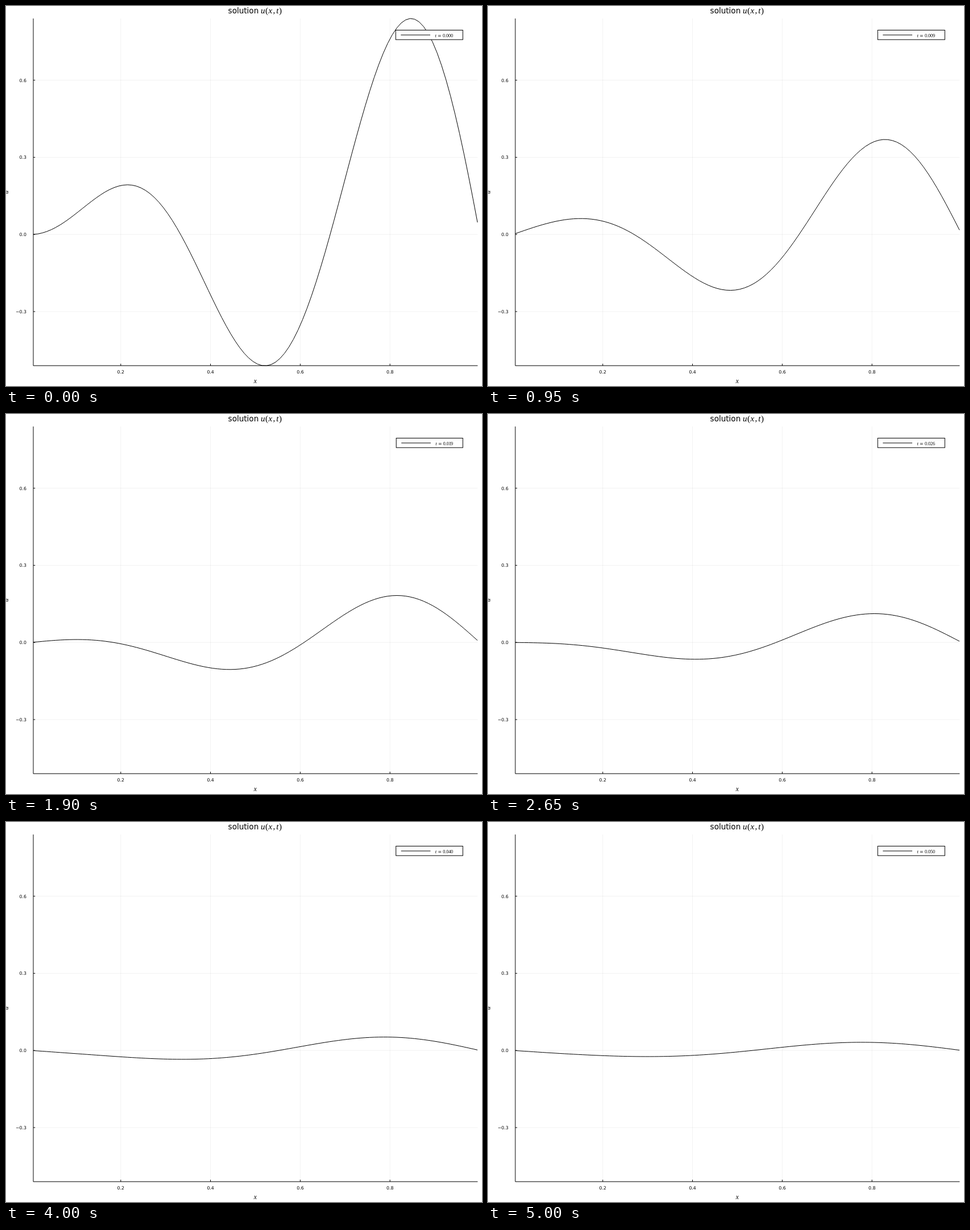
An HTML page for the animation above (5.05 s loop, 837 by 669 pixels).

```html
<!DOCTYPE html>
<html lang="en">
<head>
<meta charset="utf-8">
<title>Heat equation</title>
<style>
  html, body { margin: 0; width: 100%; height: 100%; overflow: hidden; background: #fff; }
  svg { display: block; width: 100%; height: 100%; }
  text { font: 7.8px "DejaVu Sans", sans-serif; fill: #000; }
  .math { font-family: "Liberation Serif", serif; }
  .it { font-style: italic; }
  .ink { fill: none; stroke: #000; stroke-width: 1; }
  .grid { stroke: #000; stroke-opacity: .055; }
</style>
</head>
<body>
<svg viewBox="0 0 837 669">
  <g id="axes"></g>
  <path class="ink" d="M48 22V633.2H829.4"/>
  <text x="390.6" y="13" style="font-size:13.55px">solution</text>
  <g id="title"></g>
  <text class="math it" x="438.2" y="664" text-anchor="middle" style="font-size:11.5px">x</text>
  <text class="math it" transform="translate(4 327.6) rotate(-90)" text-anchor="middle" style="font-size:11.5px">u</text>
  <path id="curve" class="ink" stroke-linejoin="round"/>
  <rect id="box" class="ink" y="42.5" height="16.7" style="fill:#fff"/>
  <g id="key">
    <path class="ink" d="M694.3 51H746"/>
    <text class="math it" x="754.4" y="54.5" style="font-size:8.4px">t</text>
    <text x="759.1" y="54.6">=</text>
  </g>
  <text id="time" class="math" x="785.9" y="54.5" text-anchor="end" style="font-size:8px"></text>
</svg>
<script>
const STEP = 50, FRAMES = 101, CELLS = 100, MODES = 100;
const $ = id => document.getElementById(id);
const px = x => 201.8 + (x - 0.2) * 789;
const py = u => 402.2 - u * 452.6;

function add(parent, tag, attrs, text = "") {
  const el = document.createElementNS("http://www.w3.org/2000/svg", tag);
  for (const k in attrs) el.setAttribute(k, attrs[k]);
  el.textContent = text;
  parent.append(el);
}

function drawAxes() {
  const g = $("axes");
  for (const v of [0.2, 0.4, 0.6, 0.8]) {
    const x = px(v);
    add(g, "path", { class: "grid", d: `M${x} 22V633` });
    add(g, "path", { class: "ink", d: `M${x} 633V629.8` });
    add(g, "text", { x, y: 647.3, "text-anchor": "middle" }, v.toFixed(1));
  }
  for (const v of [-0.3, 0, 0.3, 0.6]) {
    const y = py(v);
    add(g, "path", { class: "grid", d: `M48 ${y}H829.4` });
    add(g, "path", { class: "ink", d: `M48 ${y}H51.2` });
    add(g, "text", { x: 36, y: y + 2.9, "text-anchor": "end" }, v.toFixed(1).replace("-", "−"));
  }
}

function drawTitle() {
  const glyphs = [["u", 448], ["(", 456.1], ["x", 461.5], [",", 469.6], ["t", 475.2], [")", 479.9]];
  for (const [c, x] of glyphs) {
    const slant = /\w/.test(c) ? " it" : "";
    add($("title"), "text", { class: "math" + slant, x, y: 13, style: "font-size:15px" }, c);
  }
}

// Sine coefficients of u(x, 0) = x sin(3πx) on [0, 1]
function coef(n) {
  if (n === 3) return 0.5;
  if (n % 2) return 0;
  return 2 / Math.PI ** 2 * (1 / (n + 3) ** 2 - 1 / (n - 3) ** 2);
}

function solution(t) {
  const amps = [];
  for (let n = 2; n <= MODES; n++) {
    const a = coef(n) * Math.exp(-((n * Math.PI) ** 2) * t);
    if (Math.abs(a) > 1e-8) amps.push([n * Math.PI, a]);
  }
  return x => amps.reduce((sum, [k, a]) => sum + a * Math.sin(k * x), 0);
}

function drawCurve(t) {
  const u = solution(t), pts = [];
  for (let i = 0; i < CELLS; i++) {
    const x = (i + 0.5) / CELLS;
    pts.push(px(x).toFixed(2) + " " + py(u(x)).toFixed(2));
  }
  $("curve").setAttribute("d", "M" + pts.join("L"));
}

// Narrow digits tighten the label and the legend box with it
function drawLegend(t) {
  const label = t.toFixed(3), narrow = { 1: 0.9, 4: 0.4 };
  const trims = [...label].map(c => narrow[c] || 0);
  const shift = trims.reduce((a, b) => a + b);
  $("time").textContent = label;
  $("time").setAttribute("dx", [0, ...trims.slice(0, -1).map(v => -v)].join(" "));
  $("key").setAttribute("transform", `translate(${shift} 0)`);
  $("box").setAttribute("x", 685.3 + shift);
  $("box").setAttribute("width", 118 - shift);
}

let shown = -1;
function tick() {
  const frame = Math.floor(performance.now() / STEP) % FRAMES;
  if (frame !== shown) {
    shown = frame;
    drawCurve(frame / 2000);
    drawLegend(frame / 2000);
  }
  requestAnimationFrame(tick);
}

drawAxes();
drawTitle();
tick();
</script>
</body>
</html>
```
